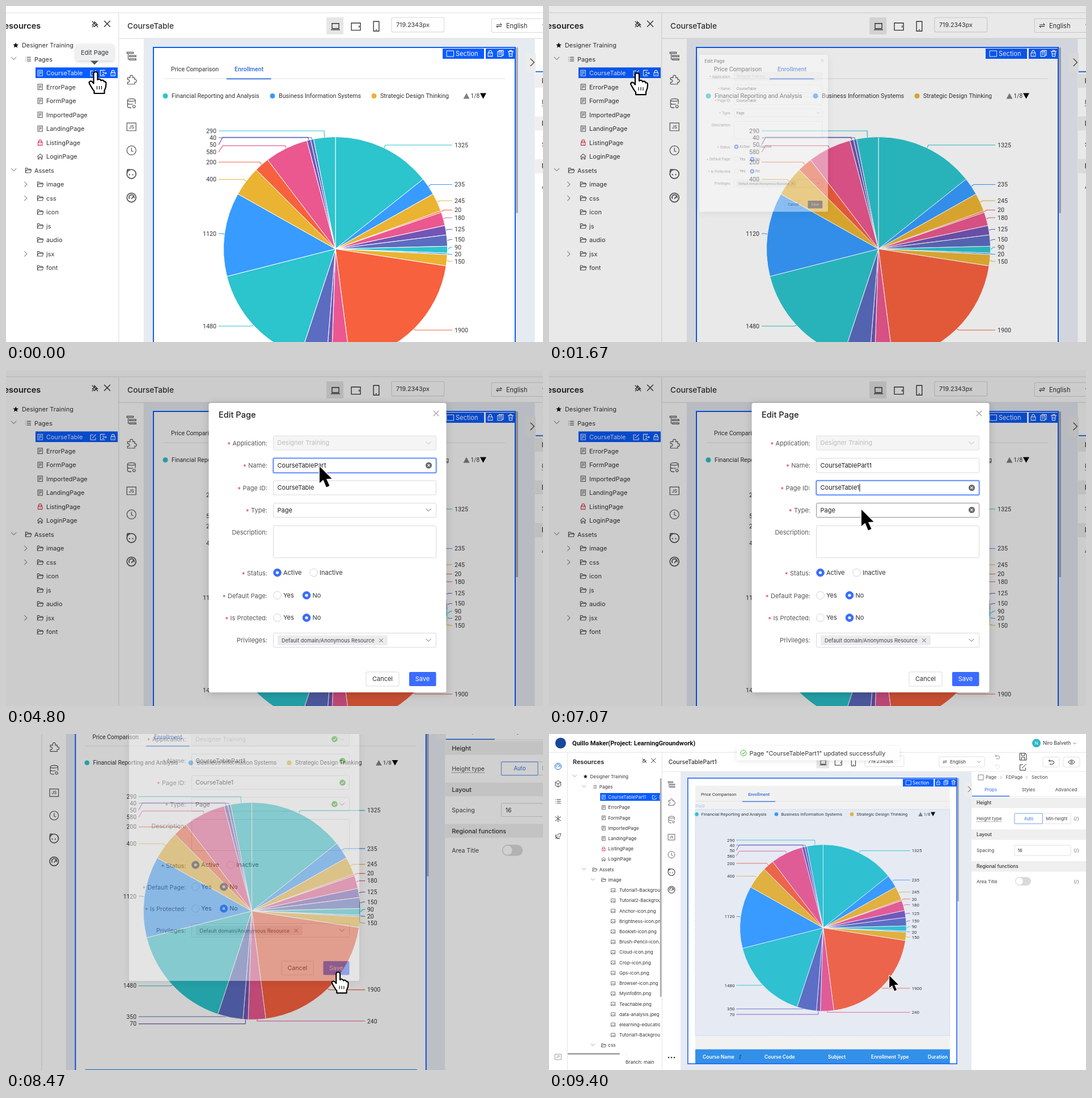
These frames come from a looping animation (947x592 px, 9.47 s). An HTML page with a canvas:

```html
<!DOCTYPE html>
<html lang="en">
<head>
<meta charset="utf-8">
<title>Page editor</title>
<style>
html, body { margin: 0; width: 100%; height: 100%; overflow: hidden; background: #fff; }
canvas { display: block; width: 100vw; height: 100vh; }
</style>
</head>
<body>
<canvas id="stage" width="947" height="592"></canvas>
<script>
const screen2d = document.getElementById('stage').getContext('2d');
const sheet = Object.assign(document.createElement('canvas'), { width: 947, height: 592 });
const sheet2d = sheet.getContext('2d');
let ctx = screen2d;

const LOOP = 9470, ZOOM = 1.345, OX = 69.3, OY = 31.5;
const INTER = 'Inter, sans-serif', ROBOTO = 'Roboto, sans-serif';
const INK = '#333', BLUE = '#0a5cff', SOFT = '#3b6cff', EDGE = '#d9d9d9';
const PALETTE = ['#2cc4cd', '#379bff', '#eab332', '#f7613e', '#ea588f', '#7355b5', '#5c6cc0'];
const VALUES = [1325, 235, 245, 20, 180, 125, 150, 90, 20, 150, 1900, 240, 70, 350, 1480, 1120, 400, 200, 580, 50, 40, 290];
const LABEL_Y = [245, 314.5, 343, 359.5, 373, 393.5, 411.5, 425, 437.5, 450, 571, 628, 633, 620, 564, 401, 305.5, 275, 257.5, 244.5, 232, 220];
const ICON = {
  star: 'M0-6L1.7-2 6-1.6 2.8 1.2 3.8 5.5 0 3.2-3.8 5.5-2.8 1.2-6-1.6-1.7-2Z',
  list: 'M-3-4H6M-3 0H6M-3 4H6M-6-4H-5M-6 0H-5M-6 4H-5',
  doc: 'M-5-6H5V6H-5ZM-3-3H3M-3 0H3M-3 3H0',
  lock: 'M-4.5-1H4.5V6H-4.5ZM-3-1V-3A3 3 0 0 1 3-3V-1M0 2V4',
  home: 'M-6 0L0-5.5 6 0M-4.5-1V5.5H-2V1.5H2V5.5H4.5V-1',
  folder: 'M-6 5V-5H-2L-.5-3H5V-1M-6 5L-4-1H7L5 5Z',
  image: 'M-6-5H6V5H-6ZM-5 4L-1 0 2 3 4 1 6 3M2-2H3',
  edit: 'M0-5H-6V6H5V1M-2 2L6-6',
  exit: 'M4-6H-6V6H4M-2-2H2M0 0H7M5-2L7 0 5 2M-2 3H2',
  copy: 'M-6-4H3V6H-6ZM-3-4V-6H6V4H3M-4-1H1M-4 2H1',
  trash: 'M-6-4H6M-4-4L-3 6H3L4-4M-2-4V-6H2V-4M-1.5-1V3M1.5-1V3',
  cross: 'M-5-5L5 5M5-5L-5 5',
  down: 'M-5-2.5L0 2.5 5-2.5',
  right: 'M-2.5-5L2.5 0-2.5 5',
  pin: 'M-1-5L5 1 2 1-1 5-5 1-1-2ZM-4 4L-6 6M-6-6L6 6',
  laptop: 'M-6-5H6V4H-6ZM-8 6H8',
  tablet: 'M-7-5H7V6H-7ZM5-1V2',
  phone: 'M-4-7H4V7H-4ZM-1 5H1',
  swap: 'M-6-2H6L3-5M6 2H-6L-3 5',
  outline: 'M-7-6H3V-4H-7ZM-3-1H7V1H-3ZM-3 4H7V6H-3ZM-5-3V5H-4',
  puzzle: 'M-6-3H-2C-4-8 4-8 2-3H5V0C9-1 9 5 5 4V7H-6V4C-2 5-2-1-6 0Z',
  data: 'M-6-5A6 2 0 0 1 6-5A6 2 0 0 1-6-5V5C-6 7-2 7 0 7M6-5V1M-6 0C-6 2 1 2 2 1M4 3A2 2 0 1 1 4 7A2 2 0 1 1 4 3',
  box: 'M-7-6H7V6H-7Z',
  clock: 'M7 0A7 7 0 1 1-7 0A7 7 0 1 1 7 0M0-4V1L3 2',
  face: 'M7 0A7 7 0 1 1-7 0A7 7 0 1 1 7 0M-7-3L-6-7-2-7M-3 0V2M2 0V2',
  gauge: 'M7 0A7 7 0 1 1-7 0A7 7 0 1 1 7 0M-3 2A4 4 0 1 1 4 1M0 2L3-2',
  cube: 'M0-7L6-3.5V3.5L0 7-6 3.5V-3.5ZM-6-3.5L0 0 6-3.5M0 0V7',
  nodes: 'M0-6V6M-5-4L5 4M-5 4L5-4M-6-4H-4M4-4H6M-6 4H-4M4 4H6M-1-6H1M-1 6H1',
  rocket: 'M6-6C0-6-5-1-5 2L-2 5C1 5 6 0 6-6ZM-6 6L1-1M-5-4A7 7 0 0 0 4 5',
  undo: 'M-4-6L-6-3-3-1M-6-3H2A4 4 0 0 1 2 5H-4',
  save: 'M-6-6H4L6-4V6H-6ZM-3-6V-2H3V-6M-3 6V1H3V6',
  eye: 'M-7 0C-3-6 3-6 7 0C3 6-3 6-7 0ZM2 0A2 2 0 1 1-2 0A2 2 0 1 1 2 0',
  check: 'M-2.5 0L-.5 2 3-2'
};
const PAGES = ['ErrorPage', 'FormPage', 'ImportedPage', 'LandingPage', 'ListingPage', 'LoginPage'];
const FOLDERS = ['image', 'css', 'icon', 'js', 'audio', 'jsx', 'font'];
const FILES = ['Tutorial1-Background.png', 'Tutorial2-Background.png', 'Anchor-icon.png', 'Brightness-icon.png', 'Booklet-icon.png',
  'Brush-Pencil-icon.png', 'Cloud-icon.png', 'Crop-icon.png', 'Gps-icon.png', 'Browser-icon.png', 'MyinfoBtn.png',
  'Teachable.png', 'data-analysis.jpeg', 'elearning-education.png', 'Tutorial1-Background.jpg'];

const clamp = v => Math.max(0, Math.min(1, v));
const span = (t, a, b) => clamp((t - a) / (b - a));
const ease = u => u < .5 ? 2 * u * u : 1 - 2 * (1 - u) * (1 - u);
const lerp = (a, b, u) => a + (b - a) * u;

// Interpolates rows of [time, ...numbers].
function track(keys, t) {
  let i = 0;
  while (i < keys.length - 2 && t >= keys[i + 1][0]) i++;
  const [a, b] = [keys[i], keys[i + 1]], u = ease(span(t, a[0], b[0]));
  return a.slice(1).map((v, k) => lerp(v, b[k + 1], u));
}
function group(fn) { ctx.save(); fn(); ctx.restore(); }
// Runs fn in the coordinates of the close-up view.
function closeup(fn) {
  group(() => { ctx.scale(1 / ZOOM, 1 / ZOOM); ctx.translate(OX, OY); fn(); });
}
// Draws fn on a separate sheet and lays it down with one opacity.
function faded(alpha, fn) {
  const view = ctx.getTransform();
  sheet2d.clearRect(0, 0, 947, 592);
  ctx = sheet2d;
  group(() => { ctx.setTransform(view); fn(); });
  ctx = screen2d;
  group(() => { ctx.resetTransform(); ctx.globalAlpha = alpha; ctx.drawImage(sheet, 0, 0); });
}
function rect(x0, y0, x1, y1, fill, stroke, r = 0, lw = 1) {
  ctx.beginPath();
  ctx.roundRect(x0, y0, x1 - x0, y1 - y0, r);
  if (fill) { ctx.fillStyle = fill; ctx.fill(); }
  if (stroke) { ctx.strokeStyle = stroke; ctx.lineWidth = lw; ctx.stroke(); }
}
function line(color, lw, ...p) {
  ctx.beginPath();
  for (let i = 0; i < p.length; i += 2) ctx.lineTo(p[i], p[i + 1]);
  ctx.strokeStyle = color; ctx.lineWidth = lw; ctx.stroke();
}
function disc(x, y, r, fill, stroke) {
  ctx.beginPath(); ctx.arc(x, y, r, 0, 7);
  if (fill) { ctx.fillStyle = fill; ctx.fill(); }
  if (stroke) { ctx.strokeStyle = stroke; ctx.lineWidth = 1; ctx.stroke(); }
}
function text(s, x, y, size, color = INK, weight = 400, align = 'left', font = INTER) {
  ctx.font = `${weight} ${size}px ${font}`;
  ctx.textAlign = align; ctx.fillStyle = color;
  ctx.fillText(s, x, y + size * .36);
  return ctx.measureText(s).width;
}
function icon(name, x, y, color = '#555', k = .65, lw = .8, filled) {
  group(() => {
    ctx.translate(x, y); ctx.scale(k, k);
    const p = new Path2D(ICON[name]);
    ctx.strokeStyle = ctx.fillStyle = color; ctx.lineWidth = lw / k;
    filled ? ctx.fill(p) : ctx.stroke(p);
  });
}
function triangle(x, y, w, h, color) {
  ctx.beginPath(); ctx.moveTo(x - w, y + h); ctx.lineTo(x + w, y + h); ctx.lineTo(x, y - h);
  ctx.fillStyle = color; ctx.fill();
}
function shadowed(blur, fn, alpha = .18) {
  group(() => { ctx.shadowColor = `rgba(0,0,0,${alpha})`; ctx.shadowBlur = blur; ctx.shadowOffsetY = 2; fn(); });
}

function row(i, level, glyph, label, caret, color = INK) {
  const x = [72.3, 88.7, 104.3, 124][level], y = 74.8 + 18.22 * i, ix = x - (level > 2 ? 11 : 8);
  const tint = color !== INK ? color : glyph === 'lock' ? '#d4213d' : glyph === 'star' ? '#111' : '#555';
  icon(glyph, ix, y, tint, .6, .8, glyph === 'star');
  if (caret) icon(caret, ix - 19, y - (caret === 'down' ? 1 : 0), '#888', .68, .8);
  text(label, x, y, 8.15, color);
}
function tree(done) {
  ctx.beginPath(); ctx.rect(32, 60, done ? 164 : 167, 504); ctx.clip();
  row(0, 0, 'star', 'Designer Training', done && 'down');
  row(1, 1, 'list', 'Pages', 'down');
  rect(90.2, 103.9, 198, 117.8, BLUE);
  row(2, 2, 'doc', done ? 'CourseTablePart1' : 'CourseTable', null, '#e6eeff');
  ['edit', 'exit', 'lock'].forEach((g, i) => icon(g, (done ? 186 : 166) + i * 12.9, 111.3, '#fff', .6, .8));
  PAGES.forEach((p, i) => row(3 + i, 2, ['doc', 'doc', 'doc', 'doc', 'lock', 'home'][i], p));
  row(9, 1, 'folder', 'Assets', 'down');
  if (done) {
    row(10, 2, 'folder', 'image', 'down');
    FILES.forEach((f, i) => row(11 + i, 3, 'image', f));
    row(26, 2, 'folder', 'css', 'down');
    row(27, 3, 'doc', 'main.css');
  } else {
    FOLDERS.forEach((f, i) => row(10 + i, 2, 'folder', f, [0, 1, 5].includes(i) && 'right'));
  }
}
function sidebar(done, loading) {
  text('Resources', 42, 49.5, 10.8, '#222', 600);
  icon('pin', 168.2, 47.3, '#333', .65, 1);
  icon('cross', 184.2, 46.8, '#333', .8, 1);
  if (!loading) group(() => tree(done));
  if (done) {
    rect(195.8, 78, 198.5, 463, '#a9a9a9', null, 1);
    rect(33, 562, 125, 565, '#a9a9a9', null, 1);
  }
  text('Branch: main', 135, 578.5, 8.2);
}
function header() {
  disc(20.5, 16, 9.5, '#17489c');
  text('Quillo Maker(Project: LearningGroundwork)', 41, 16.5, 11.1, '#111', 700, 'left', ROBOTO);
  disc(859.5, 16, 7.5, '#2ab8c4');
  text('N', 859.5, 16, 8, '#fff', 400, 'center');
  text('Niro Balveth', 871, 16, 8.6);
  icon('down', 927, 16.5, '#555', .5, .8);
  line('#e4e4e4', 1, 0, 32.3, 947, 32.3);
  line('#e4e4e4', 1, 32.3, 32, 32.3, 592);
  line('#e4e4e4', 1, 199.3, 32, 199.3, 592);
  line('#e4e4e4', 1, 199, 66, 947, 66);
  ['gauge', 'cube', 'list', 'nodes', 'rocket'].forEach((g, i) =>
    icon(g, 16, 57 + 30.8 * i, i ? '#444' : '#1a62d6', .8, 1));
  icon('box', 16, 569, '#888', .8, .8);
  text('JP', 16, 569, 6, '#888', 400, 'center');
}
function toolbar(done) {
  text(done ? 'CourseTablePart1' : 'CourseTable', 210.7, 49.2, 10.2, INK, 500);
  rect(471.6, 38.3, 494, 60.6, '#e6e6e6', null, 1);
  icon('laptop', 483.5, 50, '#333', .75, 1);
  icon('tablet', 510.3, 50, '#333', .85, 1);
  icon('phone', 537, 50, '#333', .9, 1);
  rect(557, 38.5, 626, 57.5, '#fff', EDGE, 2, .8);
  text('719.2343px', 563, 48.3, 8);
  rect(688, 40, 768, 58, '#fff', EDGE, 2, .8);
  icon('swap', 698, 49, '#333', .55, .8);
  text('English', 707.2, 49.2, 8.2);
  icon('down', 758, 49, '#666', .6, .8);
  icon('undo', 791, 40.5, '#777', .65, .8);
  icon('undo', 791, 57, '#ddd', .65, .8);
  icon('save', 836, 40, '#333', 1, 1);
  icon('edit', 836, 58.5, '#333', .9, 1);
  rect(871, 40.5, 900, 58, '#fff', EDGE, 3, .8);
  rect(906.5, 40.5, 936, 58, '#fff', EDGE, 3, .8);
  icon('undo', 886, 49.5, '#222', .75, 1);
  icon('eye', 921.5, 49.5, '#222', .8, 1);
  ['outline', 'puzzle', 'data', 'box', 'clock', 'face', 'gauge'].forEach((g, i) =>
    icon(g, 216, 89 + 30.9 * i, '#555', .85, i > 4 ? 1.3 : .9));
  text('JS', 216, 182, 5.6, '#444', 500, 'center');
  for (let i = 0; i < 3; i++) disc(211 + i * 5, 570, 1.3, '#333');
}
function panel() {
  rect(745, 66.5, 947, 592, '#fff');
  rect(732.5, 85, 746, 111, '#ececec');
  icon('right', 741.5, 97.3, '#444', 1, 1);
  rect(757, 72, 766, 81, null, '#666', 0, .8);
  ['Page', 'FDPage', 'Section'].forEach((s, i) => text(s, [770, 805.5, 851][i], 76.5, 8, '#444'));
  icon('right', 797, 76.5, '#777', .45, .7);
  icon('right', 842, 76.5, '#777', .45, .7);
  ['Props', 'Styles', 'Advanced'].forEach((s, i) =>
    text(s, 779 + 66.5 * i, 98.5, 8.1, i ? '#444' : '#2f6fe0', 400, 'center'));
  line('#e4e4e4', .8, 746, 110, 947, 110);
  line('#2f6fe0', 1.5, 746, 109.5, 812, 109.5);
  ['Height', 'Layout', 'Regional functions'].forEach((s, i) => {
    rect(745, 112 + 56 * i, 947, 130.5 + 56 * i, '#efefef');
    text(s, 754, 121.3 + 56 * i, 8.3, '#333', 500);
  });
  ['Height type', 'Spacing', 'Area Title'].forEach((s, i) => {
    const y = [149, 205, 260][i];
    text(s, 754, y, 8.1, '#444');
    text('{/}', 930, y, 8, '#666', 400, 'center');
  });
  ctx.setLineDash([1.5, 1]);
  line('#666', .8, 754, 154.5, 799, 154.5);
  ctx.setLineDash([]);
  rect(821, 140, 920, 158, '#fff', EDGE, 1, .8);
  rect(821, 140, 870.5, 158, '#fff', '#6d9bea', 1, .9);
  text('Auto', 846, 149, 7.4, '#2f6fe0', 400, 'center');
  text('Min-height', 895.5, 149, 7.4, '#444', 400, 'center');
  rect(821, 196, 920, 214, '#fff', EDGE, 1, .8);
  text('16', 826.5, 205, 8.1);
  rect(822, 252, 850, 267, '#dadada', null, 7.5);
  disc(829.5, 259.5, 6.2, '#fff');
}
function pie() {
  const cx = 581, cy = 428, r = 197.5, total = VALUES.reduce((a, b) => a + b);
  let at = -Math.PI / 2;
  VALUES.forEach((v, i) => {
    const sweep = v / total * 2 * Math.PI, mid = at + sweep / 2, color = PALETTE[i % 7];
    const c = Math.cos(mid), s = Math.sin(mid), side = Math.sign(c), ly = LABEL_Y[i];
    const ex = cx + c * (r + 5), raw = cy + s * (r + 5);
    const ey = Math.abs(raw - ly) < 8 ? ly : raw, end = side > 0 ? 787 : 375;
    const bend = side > 0 ? Math.max(ex, end - 7) : end + 7;
    line(color, 1.2, cx + c * r, cy + s * r, ex, ey, bend, ey, end, ly);
    text(v, side > 0 ? 791 : 371, ly, 10.7, INK, 400, side > 0 ? 'left' : 'right', ROBOTO);
    ctx.beginPath(); ctx.moveTo(cx, cy); ctx.arc(cx, cy, r, at, at + sweep); ctx.closePath();
    ctx.fillStyle = color; ctx.fill();
    ctx.strokeStyle = '#fff'; ctx.lineWidth = 1; ctx.stroke();
    at += sweep;
  });
}
function chart() {
  text('Price Comparison', 291, 111.5, 10.6, INK, 400, 'left', ROBOTO);
  text('Enrollment', 403, 111.5, 10.6, '#2f6bd8', 500, 'left', ROBOTO);
  line('#e2e2e2', 1, 278, 128, 880, 128);
  line('#2f6bd8', 1.8, 389, 128.3, 467.5, 128.3);
  ['Financial Reporting and Analysis', 'Business Information Systems', 'Strategic Design Thinking'].forEach((s, i) => {
    const x = [281, 470, 649][i];
    disc(x, 158.5, 4.5, PALETTE[i]);
    text(s, x + 11, 158, 10.7, INK, 400, 'left', ROBOTO);
  });
  triangle(812, 158.5, 5.5, 5, '#808080');
  text('1/8', 819.5, 158.5, 10.2, INK, 400, 'left', ROBOTO);
  triangle(841.5, 158.5, 5.5, -5, '#000');
  pie();
}
function hoverFrame() {
  rect(258, 133, 707, 531.5, 'rgba(90,140,255,.07)');
  ctx.setLineDash([2, 1.5]);
  rect(258, 133, 707, 531.5, null, '#a9cdf5', 0, .8);
  ctx.setLineDash([]);
  text('Pie9', 258, 127.5, 8, '#a9c8ee');
}
function board(hover) {
  rect(232, 66.5, 745, 592, '#e6eaf1');
  rect(244.8, 77.7, 719.2, 581, '#fff');
  if (hover) rect(258, 91, 707, 555, '#f1f1f2');
  rect(258, 555.5, 707, 581, '#3390e8');
  ['Course Name', 'Course Code', 'Subject', 'Enrollment Type', 'Duration'].forEach((s, i) =>
    text(s, [271, 380, 492, 568, 668][i], 569, 8.5, '#fff', 600));
  line('#18467a', 1, 335, 571, 337, 573, 337, 565, 339, 567);
  closeup(chart);
  if (hover) hoverFrame();
  closeup(() => {
    rect(260, 73, 898, 750, null, BLUE, 0, 2);
    rect(770, 75, 843, 93, BLUE);
    rect(777, 79, 789.5, 89, null, '#fff');
    text('Section', 793, 84, 11.1, '#fff');
    rect(846, 75, 898, 93, BLUE);
    ['lock', 'copy', 'trash'].forEach((g, i) => icon(g, 854 + 18 * i, 83.5, '#fff', .85, 1.1));
    rect(899.5, 73, 902.8, 365, '#a6a6a6', null, 1);
  });
  rect(232, 582, 745, 592, '#e6eaf1');
}

function tooltip() {
  shadowed(6, () => rect(123.5, 67.5, 190, 96, '#eef0f2', null, 3));
  triangle(156, 100, 7, -3.5, '#555');
  text('Edit Page', 156.5, 82, 11, INK, 400, 'center');
}
function label(s, y, required) {
  const w = text(s + ':', 461, y, 11, '#555', 400, 'right');
  if (required) text('*', 461 - w - 9, y + 2, 11, '#e0322d');
}
function field(y0, y1, value, focus, hover) {
  if (focus) rect(471, y0, 759, y1, null, 'rgba(59,108,255,.18)', 2, 4);
  rect(471.5, y0, 758.5, y1, '#fff', focus ? '#4a7dff' : hover ? '#8f8f8f' : EDGE, 2, focus ? 1.5 : 1);
  return text(value, 478.5, (y0 + y1) / 2, 11, '#222');
}
function badge(x, y, color, glyph) {
  disc(x, y, 5.5, color);
  icon(glyph, x, y, '#fff', glyph === 'check' ? 1 : .42, 1.2);
}
function radio(x, y, s, on) {
  disc(x, y, 6.8, on ? SOFT : '#fff', on ? SOFT : '#d2d2d2');
  if (on) disc(x, y, 2.6, '#fff');
  text(s, x + 10.5, y, 11, '#333');
}
function dialog(t) {
  const typed = [4000, 4130, 4270, 4470, 5060].filter(k => t >= k).length;
  const name = 'CourseTable' + 'Part1'.slice(0, typed), id = 'CourseTable' + (t >= 6450 ? '1' : '');
  const onName = t >= 2650 && t < 5850, onId = t >= 5850 && t < 8100, valid = t >= 8150;
  const onType = t > 6850 && t < 7350;
  const caret = (w, y, since) => {
    if (t >= since && Math.floor((t - since) / 530) % 2 === 0) line('#222', 1, 479 + w, y - 7, 479 + w, y + 7);
  };
  shadowed(14, () => rect(357.5, 58, 776.5, 568, '#fff', null, 4));
  text('Edit Page', 375, 79, 14.6, '#222', 500);
  icon('cross', 758.5, 76.5, '#666', .95, 1);
  ['Application', 'Name', 'Page ID', 'Type', 'Description', 'Status', 'Default Page', 'Is Protected', 'Privileges'].forEach((s, i) =>
    label(s, [129, 168, 208, 247, 286.5, 358.5, 398, 437, 476.5][i], i !== 4 && i !== 8));
  rect(471.5, 116, 758.5, 141, '#f5f5f5', '#e0e0e0', 2);
  text('Designer Training', 478.5, 128.5, 11, '#bdbdbd');
  icon('down', 745, 128.5, '#bbb', .9, 1);
  const nameW = field(155.5, 181, name, onName);
  if (t >= 2750 && t < 3200) {
    rect(478, 161, 478.5 + nameW, 175, '#c9c9c9');
    text(name, 478.5, 168.2, 11, '#222');
  }
  if (onName) { badge(745.5, 168, '#666', 'cross'); caret(nameW, 168, 3200); }
  const idW = field(195, 220, id, onId);
  if (onId) { badge(745.5, 207.5, '#666', 'cross'); caret(idW, 207.5, 5900); }
  field(234.5, 259.5, 'Page', false, onType);
  if (onType) badge(745.5, 246.5, '#666', 'cross');
  else icon('down', 745, 246.5, '#666', .9, 1);
  if (valid) [[731.5, 128.5], [746, 168], [746, 207.5], [731.5, 246.5]].forEach(([x, y]) => badge(x, y, '#3fae29', 'check'));
  rect(471.5, 274.5, 758.5, 331, '#fff', EDGE, 2);
  radio(478.5, 357, 'Active', true); radio(542.5, 357, 'Inactive');
  radio(478.5, 397, 'Yes'); radio(530, 397, 'No', true);
  radio(478.5, 436.5, 'Yes'); radio(530, 436.5, 'No', true);
  rect(471.5, 463.5, 758.5, 488.5, '#fff', EDGE, 2);
  rect(479, 467.5, 673, 485, '#ececee', null, 2);
  text('Default domain/Anonymous Resource', 486, 476.5, 9.2, '#444');
  icon('cross', 661.5, 476.5, '#555', .65, 1);
  icon('down', 745, 476, '#666', .9, 1);
  rect(635, 532, 693, 557, '#fff', EDGE, 2);
  text('Cancel', 664, 544.5, 11, '#333', 400, 'center');
  rect(711, 532, 758.5, 557, SOFT, null, 2);
  text('Save', 734.5, 544.5, 11, '#fff', 400, 'center');
}
function modal(t) {
  if (t < 1560 || t > 8750) return;
  const open = ease(span(t, 1560, 1800)), close = span(t, 8360, 8560);
  const shade = .2 * open * (1 - span(t, 8450, 8750));
  rect(0, 0, 947, 592, `rgba(0,0,0,${shade})`);
  if (close >= 1) return;
  faded(open * (1 - close), () => closeup(() => {
    const k = lerp(.2, 1, open);
    ctx.translate(155 * (1 - k), 119 * (1 - k) - 13 * Math.min(1, close * 2));
    ctx.scale(k, k);
    dialog(t);
  }));
}

function toast(t) {
  const u = ease(span(t, 8700, 8950));
  if (!u) return;
  group(() => {
    ctx.globalAlpha = u * .97;
    ctx.translate(0, -24 * (1 - u));
    shadowed(8, () => rect(331, 21, 618, 46.5, '#fff', null, 2), .1);
    disc(343, 33.5, 5, null, '#3fae29');
    icon('check', 343, 33.5, '#3fae29', .9, 1.1);
    text('Page "CourseTablePart1" updated successfully', 353.5, 33.8, 10.8);
  });
}
const HAND = new Path2D('M-3.5 1C-3.5-3 3.5-3 3.5 1V12C5 10 9 10.5 9.5 13.5 12 11.5 15 13 15 15.5 17.5 14.5 18.5 16 18.5 19 18.5 26 17 28 15.5 31V36H-2.5V32C-6 28-9 22-11 18.5-12.5 15-8 13-5.5 16L-3.5 18.5Z');
const CREASES = new Path2D('M2.5 23V29M6.5 23V29M10.5 23V29');
const ARROW = new Path2D('M0 0V29L6.5 23.5 12 36.5 17.5 34 12 22 21.5 21.5Z');
const POINTER = [[0, 158, 118], [70, 158, 118], [400, 155, 120], [1650, 155, 120], [2500, 553, 170], [5200, 553, 170],
  [5700, 552, 208], [6650, 552, 208], [6950, 551, 246], [7200, 551, 246], [7950, 738, 541], [LOOP, 738, 541]];
function pointer(t) {
  const [x, y] = track(POINTER, t);
  ctx.translate(x, y);
  ctx.lineJoin = 'round';
  if (t < 1700 || t > 7850 && t < 8600) {
    ctx.fillStyle = '#fff'; ctx.strokeStyle = '#000';
    ctx.lineWidth = 2.2; ctx.fill(HAND); ctx.stroke(HAND);
    ctx.lineWidth = 1.1; ctx.stroke(CREASES);
  } else {
    ctx.strokeStyle = '#fff'; ctx.lineWidth = 3; ctx.stroke(ARROW);
    ctx.fillStyle = '#000'; ctx.fill(ARROW);
  }
}
const CAMERA = [[0, ZOOM, -OX, -OY], [7250, ZOOM, -OX, -OY], [7950, ZOOM, -223.6, -151.6],
  [8270, ZOOM, -223.6, -151.6], [9090, 1, 0, 0], [LOOP, 1, 0, 0]];

function draw(t) {
  const [k, x, y] = track(CAMERA, t), done = t >= 8850;
  ctx.setTransform(1, 0, 0, 1, 0, 0);
  ctx.fillStyle = '#fff';
  ctx.fillRect(0, 0, 947, 592);
  ctx.setTransform(k, 0, 0, k, x, y);
  sidebar(done, t >= 8350 && !done);
  board(t >= 8750);
  header();
  toolbar(done);
  panel();
  if (t < 1600) closeup(tooltip);
  modal(t);
  toast(t);
  closeup(() => pointer(t));
}
const start = performance.now();
function tick() {
  draw((performance.now() - start) % LOOP);
  requestAnimationFrame(tick);
}
tick();
</script>
</body>
</html>
```
